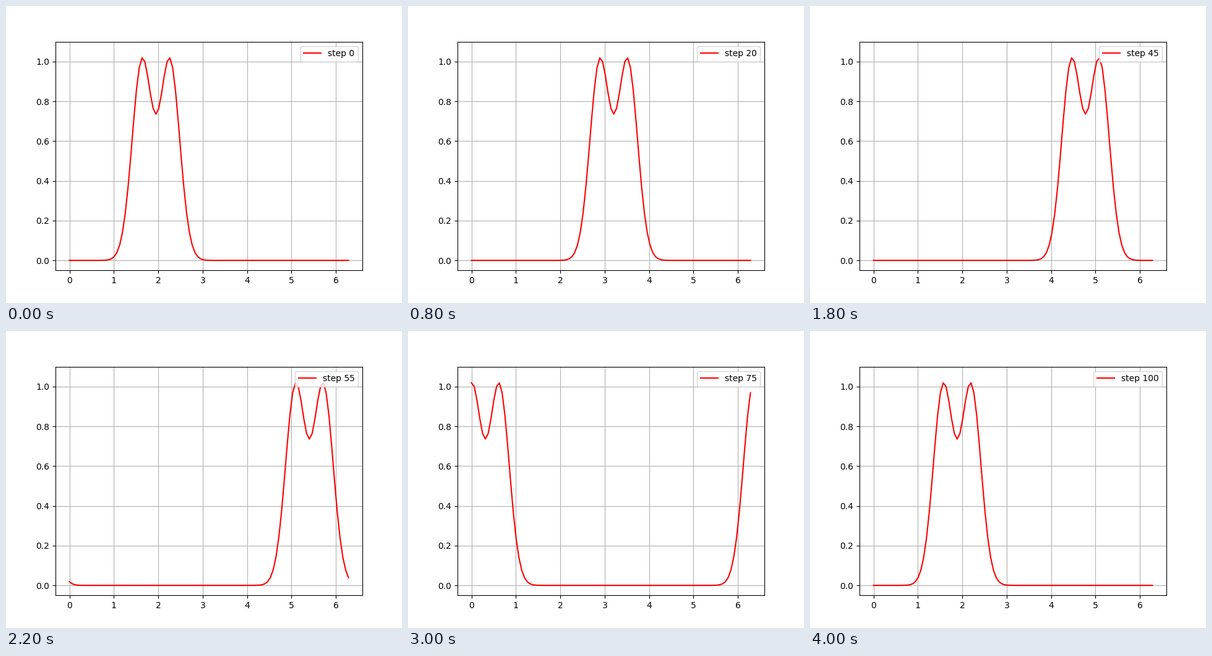
Recreate the animation shown at these times as a matplotlib script. Size 640 by 480 pixels, loop 4.2 s.

```python
import numpy as np
import matplotlib.pyplot as plt
from matplotlib.animation import FuncAnimation

POINTS = 101
STEPS_PER_FRAME = 5
FRAMES = 21
INTERVAL = 200  # ms

index = np.arange(POINTS)
x = np.linspace(0, 2 * np.pi, POINTS)


def bump(center, width=5):
    return np.exp(-((index - center) / width) ** 2)


wave = bump(26) + bump(36)

fig, ax = plt.subplots(figsize=(6.4, 4.8), dpi=100)
line, = ax.plot(x, wave, color="red", label="step 0")
ax.set_ylim(-0.05, 1.1)
ax.grid(True)
legend = ax.legend(loc="upper right")
label = legend.get_texts()[0]


def update(frame):
    """Advect the wave by one grid cell per step on a periodic domain."""
    step = frame * STEPS_PER_FRAME
    line.set_ydata(np.roll(wave, step))
    label.set_text(f"step {step}")
    return line, legend


anim = FuncAnimation(fig, update, frames=FRAMES, interval=INTERVAL,
                     repeat=True, repeat_delay=0)
plt.show()
```
